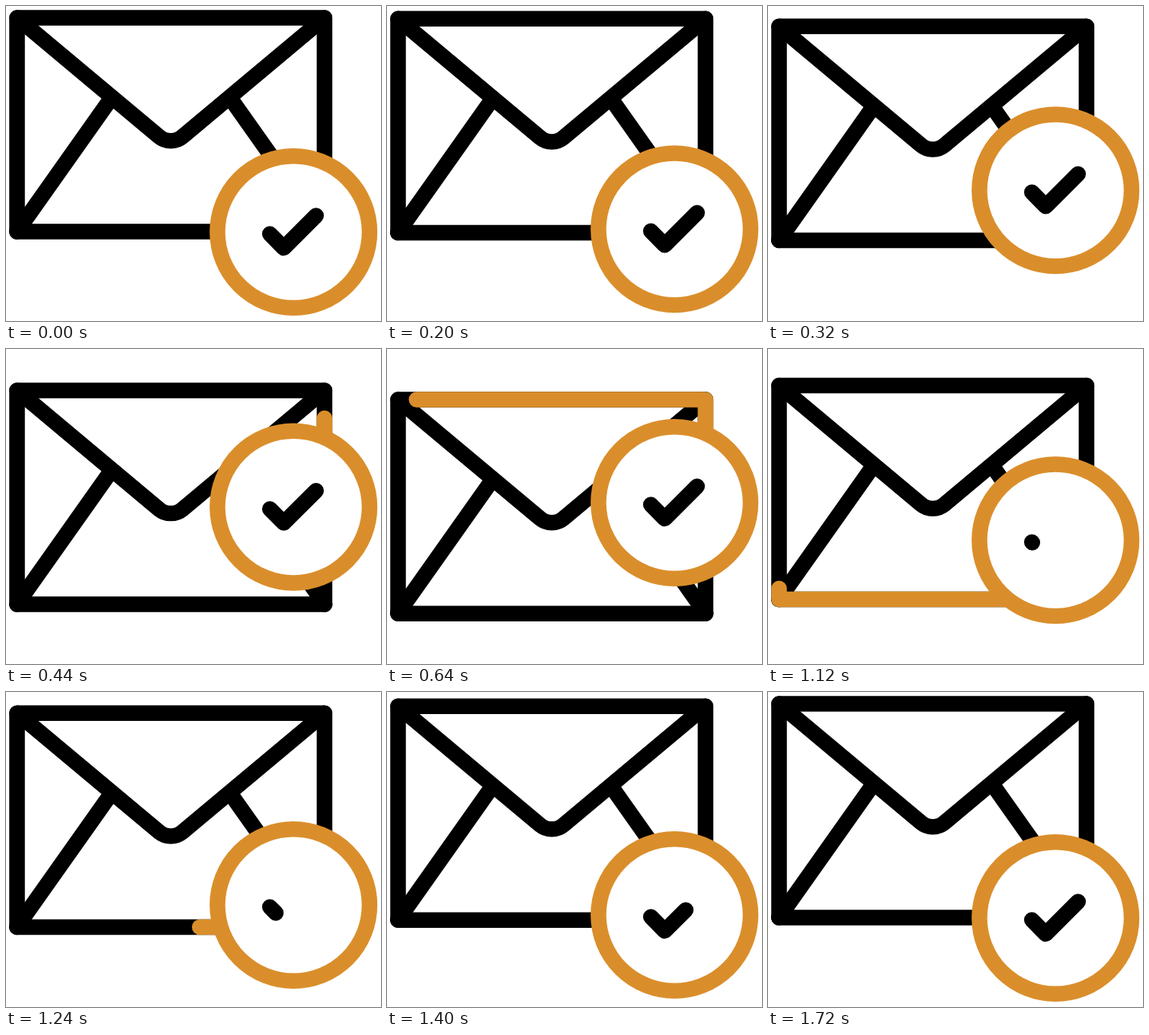
Write an HTML page that moves like this. It is 492 px wide and 414 px high and loops after 2 s.

```html
<!DOCTYPE html>
<html lang="en">
<head>
<meta charset="utf-8">
<title>Mail confirmed</title>
<style>
  html, body { margin: 0; width: 100%; height: 100%; overflow: hidden; background: #fff; }
  svg { display: block; width: 492px; height: 414px; }
  path, .ring { fill: none; stroke: #000; stroke-width: 20.5; stroke-linecap: round; stroke-linejoin: round; }
  path.trail, .ring { stroke: #da8e2b; }
</style>
</head>
<body>
<svg viewBox="0 0 492 414">
  <defs>
    <clipPath id="disc"><circle cx="377.2" cy="297" r="100"/></clipPath>
  </defs>
  <g id="mail">
    <path d="M14.2 296.6 137.6 121.8M418.2 296.6 294.8 121.8"/>
    <path d="M14.5 15.5 200.8 171.6A24 24 0 0 0 231.6 171.6L417.9 15.5"/>
    <path d="M14.5 15.5H417.9V296.6H14.5Z"/>
    <path id="trail" class="trail" d="M417.9 206.5V15.5H14.5V296.6H354"/>
  </g>
  <g id="badge">
    <circle cx="377.2" cy="297" r="100" fill="#fff"/>
    <g clip-path="url(#disc)">
      <path id="check" d="M346.2 299.6 364.4 318 406.8 275.6"/>
    </g>
    <circle class="ring" cx="377.2" cy="297" r="99.8"/>
  </g>
</svg>
<script>
const LOOP = 2000, STEP = 40;
const MAIL_DROP = 52, BADGE_LIFT = 95;
const [mail, trail, badge, check] =
  ['mail', 'trail', 'badge', 'check'].map(id => document.getElementById(id));
const trailLen = trail.getTotalLength();
const checkLen = check.getTotalLength();

// cubic-bezier(x1, 0, x2, 1) over the time from a to b
function ease(t, a, b, x1 = 0.61, x2 = 0.18) {
  const x = Math.min(1, Math.max(0, (t - a) / (b - a)));
  let lo = 0, hi = 1;
  for (let i = 0; i < 24; i++) {
    const s = (lo + hi) / 2, r = 1 - s;
    if (3 * s * r * r * x1 + 3 * s * s * r * x2 + s ** 3 < x) lo = s;
    else hi = s;
  }
  return lo * lo * (3 - 2 * lo);
}

const soft = (t, a, b) => ease(t, a, b, 1 / 3, 2 / 3);
const shift = (el, y) => el.setAttribute('transform', `translate(0 ${y.toFixed(2)})`);

function trim(el, len, from, to) {
  el.style.visibility = to > from ? 'visible' : 'hidden';
  el.style.strokeDasharray = `${(to - from) * len} ${len * 3}`;
  el.style.strokeDashoffset = -from * len;
}

function draw(t) {
  shift(mail, MAIL_DROP * (ease(t, 105, 754) - ease(t, 784, 1654)));
  shift(badge, -BADGE_LIFT * (ease(t, 120, 570) - ease(t, 749, 1619)));
  trim(trail, trailLen, soft(t, 693, 1357), soft(t, 266, 1046));

  // The tick drops out of the badge, then is drawn again
  const redraw = t >= 1100;
  const fall = Math.max(0, t - 820) / 140;
  shift(check, redraw ? 0 : 37.5 * fall * fall);
  trim(check, checkLen, 0, redraw ? ease(t, 1053, 1720) : 1);
}

function tick(now) {
  draw(Math.floor(now % LOOP / STEP) * STEP);
  requestAnimationFrame(tick);
}
draw(0);
requestAnimationFrame(tick);
</script>
</body>
</html>
```
